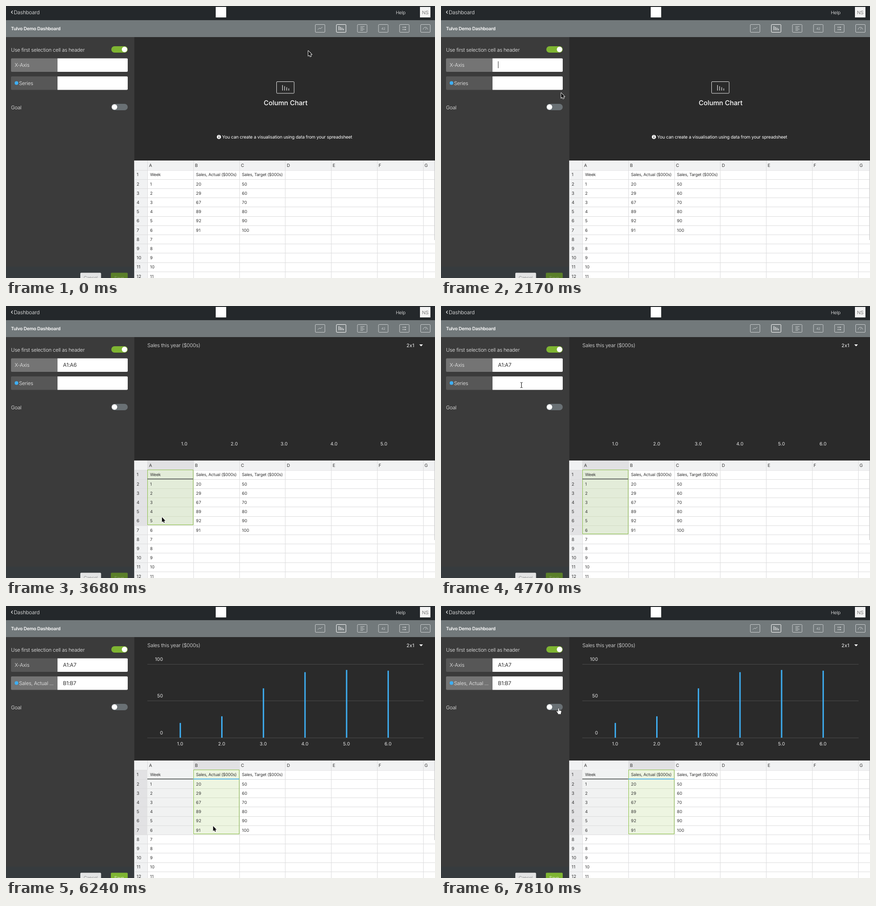
These frames come from a looping animation (941 px wide and 595 px high, 8 s). An HTML page with a canvas:

```html
<!DOCTYPE html>
<html lang="en">
<head>
<meta charset="utf-8">
<title>Dashboard column chart</title>
<style>
  html, body { margin: 0; width: 100%; height: 100%; overflow: hidden; background: #2a2a2a; }
  canvas { display: block; width: 100vw; height: 100vh; }
</style>
</head>
<body>
<canvas id="stage" width="941" height="595"></canvas>
<script>
const ctx = document.getElementById('stage').getContext('2d');
const LOOP = 8000;
const BLUE = '#3eaef2', GREEN = '#7fb532', DARK = '#2a2a2a', LIGHT = '#e9e9e9', INK = '#333';
const sales = [20, 29, 67, 89, 92, 91];

// Moments of the story, in ms
const CLICK_X = 1940, PICK_A = 2910, CLICK_SERIES = 4850, PICK_B = 5700;
const DROP_A = 4000, DROP_B = 6700;

// Pointer glides; a higher power brakes harder
const home = { x: 663, y: 98 };
const glides = [
  { from: 50, to: 560, x: 741, y: 57, power: 1 },
  { from: 560, to: 1020, x: 655, y: 166, power: 1 },
  { from: 1090, to: 1820, x: 240, y: 137, power: 3 },
  { from: 2100, to: 2680, x: 342, y: 368, power: 2 },
  { from: 3120, to: 3850, x: 342, y: 490, power: 1 },
  { from: 4100, to: 4740, x: 176, y: 173, power: 2 },
  { from: 4900, to: 5370, x: 457, y: 367, power: 2 },
  { from: PICK_B, to: 6330, x: 454, y: 491, power: 1.3 },
  { from: 6900, to: 7800, x: 258, y: 225, power: 2 }
];

function pointerAt(t) {
  let { x, y } = home;
  for (const g of glides) {
    const k = Math.min(1, Math.max(0, (t - g.from) / (g.to - g.from)));
    const eased = 1 - (1 - k) ** g.power;
    x += (g.x - x) * eased;
    y += (g.y - y) * eased;
  }
  return { x, y };
}

// Drawing helpers
const range = n => [...Array(n).keys()];

function rect(x, y, w, h, fill) {
  ctx.fillStyle = fill;
  ctx.fillRect(x, y, w, h);
}
function round(x, y, w, h, radii, fill, stroke) {
  ctx.beginPath();
  ctx.roundRect(x, y, w, h, radii);
  if (fill) { ctx.fillStyle = fill; ctx.fill(); }
  if (stroke) { ctx.strokeStyle = stroke; ctx.stroke(); }
}
function dot(x, y, r, fill) {
  ctx.beginPath();
  ctx.arc(x, y, r, 0, 7);
  ctx.fillStyle = fill;
  ctx.fill();
}
function line(points, color, width = 1) {
  ctx.beginPath();
  points.forEach(([x, y]) => ctx.lineTo(x, y));
  ctx.strokeStyle = color;
  ctx.lineWidth = width;
  ctx.stroke();
  ctx.lineWidth = 1;
}
// y is the middle of the capitals
function text(str, x, y, size, color, { weight = 400, align = 'left', track = -0.02 } = {}) {
  ctx.font = `${weight} ${size}px Inter, sans-serif`;
  ctx.letterSpacing = track * size + 'px';
  ctx.textRendering = 'geometricPrecision';
  ctx.textAlign = align;
  ctx.fillStyle = color;
  ctx.fillText(str, x, y + size * 0.364);
}
const thin = { weight: 300 }, digits = { track: 0.03 };

function columnIcon(x, bottom, gap, tallest, color) {
  range(4).forEach(i =>
    line([[x + i * gap, bottom - tallest * (1 - i / 5)], [x + i * gap, bottom]], color, 1.2));
}

function drawHeader() {
  rect(0, 0, 941, 31, '#24282b');
  line([[14.5, 10.3], [11.7, 13.5], [14.5, 16.7]], '#fff', 1.2);
  text('Dashboard', 17, 13.5, 11.6, '#f4f4f4', thin);
  rect(460, 2, 23, 23, '#fff');
  text('Help', 855, 14, 10.2, '#f4f4f4', thin);
  rect(908, 2, 23, 23, '#f3f3f3');
  text('NS', 919.5, 13.8, 10.3, '#555', { weight: 300, align: 'center' });

  rect(0, 31, 941, 37, '#72797b');
  text('Tulvo Demo Dashboard', 11, 49.5, 10, '#fff', { weight: 600 });
  drawChartPicker();
}

function drawChartPicker() {
  const soft = '#c9cdce';
  const inBox = (i, draw) => {
    ctx.save();
    ctx.translate(689 + i * 46.2, 49);
    round(-10.5, -8.5, 21, 17, 1.5, null, i === 1 ? '#fff' : soft);
    draw();
    ctx.restore();
  };
  inBox(0, () => line([[-5, 2.5], [-2, -0.5], [1, 0.5], [5, -3]], soft));
  inBox(1, () => columnIcon(-4.8, 4, 3.3, 9, '#fff'));
  inBox(2, () => range(4).forEach(i => line([[-4, i * 2.8 - 4], [5 - i % 2 * 3, i * 2.8 - 4]], soft)));
  inBox(3, () => text('42', 0, 0, 7, soft, { align: 'center' }));
  inBox(4, () => [-3.5, 1.5].forEach(y => {
    rect(-3.8, y, 2, 2, soft);
    rect(-0.3, y, 4, 2, soft);
  }));
  inBox(5, () => {
    ctx.beginPath();
    ctx.arc(0, 2.5, 5, Math.PI, 0);
    ctx.stroke();
    line([[0, 2.5], [2, -0.5]], soft);
  });
}

function toggle(y, on) {
  round(231, y - 7, 36, 14, 7, on ? GREEN : '#697074');
  dot(on ? 260 : 238, y, 6, '#fff');
}

function field(y, label, value, active, series) {
  round(11, y, 102, 29.5, [2, 0, 0, 2], active ? '#747474' : '#575757');
  round(113, y, 154, 29.5, [0, 2, 2, 0], '#fff');
  if (series) dot(23, y + 14.5, 4, BLUE);
  text(label, series ? 28.5 : 19, y + 14.5, 11.2, '#f0f0f0', thin);
  text(value, 125, y + 14.5, 11.7, INK);
}

function caret(t, from, to, y) {
  if (t >= from && t < to && (t - from) % 1000 < 500) rect(125, y, 1, 15, INK);
}

function drawSidebar(t, { endA, endB }) {
  rect(0, 68, 281.5, 527, '#3b3b3b');
  text('Use first selection cell as header', 11, 96, 11.2, '#f0f0f0', thin);
  toggle(95, true);
  const onSeries = t >= CLICK_SERIES;
  field(114.5, 'X-Axis', endA ? `A1:A${endA}` : '', !onSeries, false);
  field(154, endB ? 'Sales, Actual ...' : 'Series', endB ? `B1:B${endB}` : '', onSeries, true);
  caret(t, CLICK_X, PICK_A, 121);
  caret(t, CLICK_SERIES, PICK_B, 161);
  text('Goal', 11, 222, 11.2, '#f0f0f0', thin);
  toggle(221, false);

  const ready = endB > 1;
  rect(0, 570, 281.5, 25, '#363b3e');
  round(163, 583.5, 45.5, 20, 2, '#e3e4e4');
  text('Cancel', 185.5, 594.5, 9.8, '#777', { weight: 300, align: 'center' });
  round(230, 583.5, 37, 20, 2, ready ? GREEN : '#5a7f29');
  text('Save', 248, 594.5, 9.6, ready ? '#fff' : '#93a67a', { weight: 300, align: 'center' });
}

function drawEmptyChart() {
  round(593.5, 165.5, 38.5, 25.5, 1.5, null, LIGHT);
  columnIcon(606.5, 185, 4.6, 12, LIGHT);
  text('Column Chart', 613.3, 212, 14.6, '#fff', { weight: 500, align: 'center', track: 0 });
  dot(467, 286.5, 4.5, '#fff');
  rect(466.3, 286, 1.6, 3.2, DARK);
  rect(466.3, 283.6, 1.6, 1.4, DARK);
  text('You can create a visualisation using data from your spreadsheet', 474, 286.5, 9.85, '#fff');
}

function drawChart({ endA, endB }) {
  text('Sales this year ($000s)', 310, 85.5, 11.3, LIGHT, thin);
  text('2x1', 878.5, 86, 10.4, '#fff', { track: 0.04 });
  ctx.beginPath();
  ctx.moveTo(906.5, 84); ctx.lineTo(914.5, 84); ctx.lineTo(910.5, 88.3);
  ctx.fill();

  const base = 288, tickGap = 80.5, count = endA - 1;
  const bandX = i => 336.4 + 547.2 * (i + 0.5) / count;
  const values = sales.slice(0, Math.max(0, endB - 1));
  if (values.length) {
    const step = [10, 20, 50].find(s => 2 * s >= Math.max(...values));
    range(3).forEach(i => {
      const y = base - i * tickGap;
      rect(310, Math.floor(y), 606, 1, '#4b4b4b');
      text(String(i * step), 344.3, y - 11.2, 10.3, LIGHT, { align: 'right', track: 0.01 });
    });
    values.forEach((v, i) => {
      const h = v / step * tickGap;
      rect(bandX(i) - 1.2, base - h, 3, h, BLUE);
    });
  }
  range(count).forEach(i =>
    text(`${i + 1}.0`, bandX(i), 301.7, 10.1, LIGHT, { align: 'center', track: 0.02 }));
}

// Spreadsheet geometry
const ROW = 20.2, COL = 100.7;
const rowY = r => 338.3 + r * ROW;
const colX = c => 310.3 + c * COL;
const rowUnder = y => Math.max(1, Math.min(7, Math.floor((y - rowY(0)) / ROW)));

function selection(col, end, fill, underline, active) {
  const x = Math.floor(colX(col)), h = end * ROW;
  rect(x, rowY(1), COL, h, fill);
  for (let r = 2; r <= end; r++) rect(x, Math.round(rowY(r)), COL, 1, active ? '#d3dcc6' : '#dcdddd');
  if (active) {
    ctx.strokeStyle = '#8cbf4a';
    ctx.strokeRect(x + 0.5, 358.5, 100, Math.floor(h) - 1);
  }
  rect(x, 377.6, COL, 1.6, underline);
}

function drawSheet({ endA, endB, active }) {
  const grid = '#dcdcdd';
  rect(281.5, 338, 660, 257, '#fff');
  rect(281.5, 338, 660, 20.5, '#f1f2f3');
  rect(281.5, 338, 29, 257, '#f1f2f3');
  if (active >= 0) {
    rect(colX(active), 338, COL, 20.5, '#e1e1e3');
    rect(281.5, rowY(1), 29, (active ? endB : endA) * ROW, '#e2e2e4');
  }
  for (let r = 1; r <= 12; r++) rect(281.5, Math.round(rowY(r)), 660, 1, grid);
  for (let c = 0; c <= 6; c++) rect(Math.round(colX(c)), 338, 1, 257, grid);
  if (endA) selection(0, endA, active === 0 ? '#e3ecd9' : '#f1f2f2', '#4c5150', active === 0);
  if (endB) selection(1, endB, '#edf5e1', BLUE, true);
  rect(939.5, 338, 1.5, 174, '#d2d2d3');

  const cell = (value, c, r, style) => text(String(value), colX(c) + 5.7, rowY(r) + 10.5, 9.15, INK, style);
  [...'ABCDEFG'].forEach((letter, c) => text(letter, colX(c) + 3.5, 349, 9.5, INK));
  ['Week', 'Sales, Actual ($000s)', 'Sales, Target ($000s)'].forEach((title, c) => cell(title, c, 1));
  for (let r = 1; r <= 12; r++) {
    text(String(r), 286.5, rowY(r) + 10.5, 9.5, INK, digits);
    if (r > 1) cell(r - 1, 0, r, digits);
  }
  sales.forEach((v, i) => {
    cell(v, 1, i + 2, digits);
    cell(50 + 10 * i, 2, i + 2, digits);
  });
}

const arrow = new Path2D('M0 0V11.2L2.5 8.9 4.2 12.6 6.1 11.8 4.5 8.2H7.8Z');
const hand = new Path2D('M-1.2 0C-1.2-1.4 .8-1.4 .8 0V3.4L4.6 4.3C5.8 4.6 6 5.5 5.8 6.5L5 9.2V11.4H-1.4V9.8L-4.2 6.2C-4.8 5.2-3.6 4.4-2.8 5.2L-1.2 6.6Z');

function drawPointer({ x, y }) {
  const within = (left, top, bottom) => x > left && x < 267 && y > top && y < bottom;
  const overField = within(113, 114, 144) || within(113, 154, 183.5);
  const overToggle = within(231, 214, 228);
  ctx.save();
  ctx.translate(x, y);
  if (overField) {
    line([[0.5, -5], [0.5, 5]], '#222', 1.2);
    for (const s of [-1, 1]) line([[-2, 6 * s], [0.5, 5 * s], [3, 6 * s]], '#222');
  } else {
    const shape = overToggle ? hand : arrow;
    ctx.lineJoin = 'round';
    ctx.lineWidth = overToggle ? 1 : 1.8;
    ctx.strokeStyle = overToggle ? '#111' : '#fff';
    ctx.fillStyle = overToggle ? '#fff' : '#111';
    ctx.stroke(shape);
    ctx.fill(shape);
  }
  ctx.restore();
}

// endA and endB: last selected row of each column, 0 while nothing is picked
function stateAt(t, pointer) {
  const end = (pick, drop) => t < pick ? 0 : t < drop ? rowUnder(pointer.y) : 7;
  const active = t >= PICK_B ? 1 : t >= PICK_A && t < CLICK_SERIES ? 0 : -1;
  return { endA: end(PICK_A, DROP_A), endB: end(PICK_B, DROP_B), active };
}

function draw(t) {
  const pointer = pointerAt(t), state = stateAt(t, pointer);
  ctx.lineWidth = 1;
  rect(0, 0, 941, 595, DARK);
  drawHeader();
  drawSidebar(t, state);
  if (state.endA) drawChart(state); else drawEmptyChart();
  drawSheet(state);
  drawPointer(pointer);
}

const start = performance.now();
function tick() {
  draw((performance.now() - start) % LOOP);
  requestAnimationFrame(tick);
}
tick();
</script>
</body>
</html>
```
